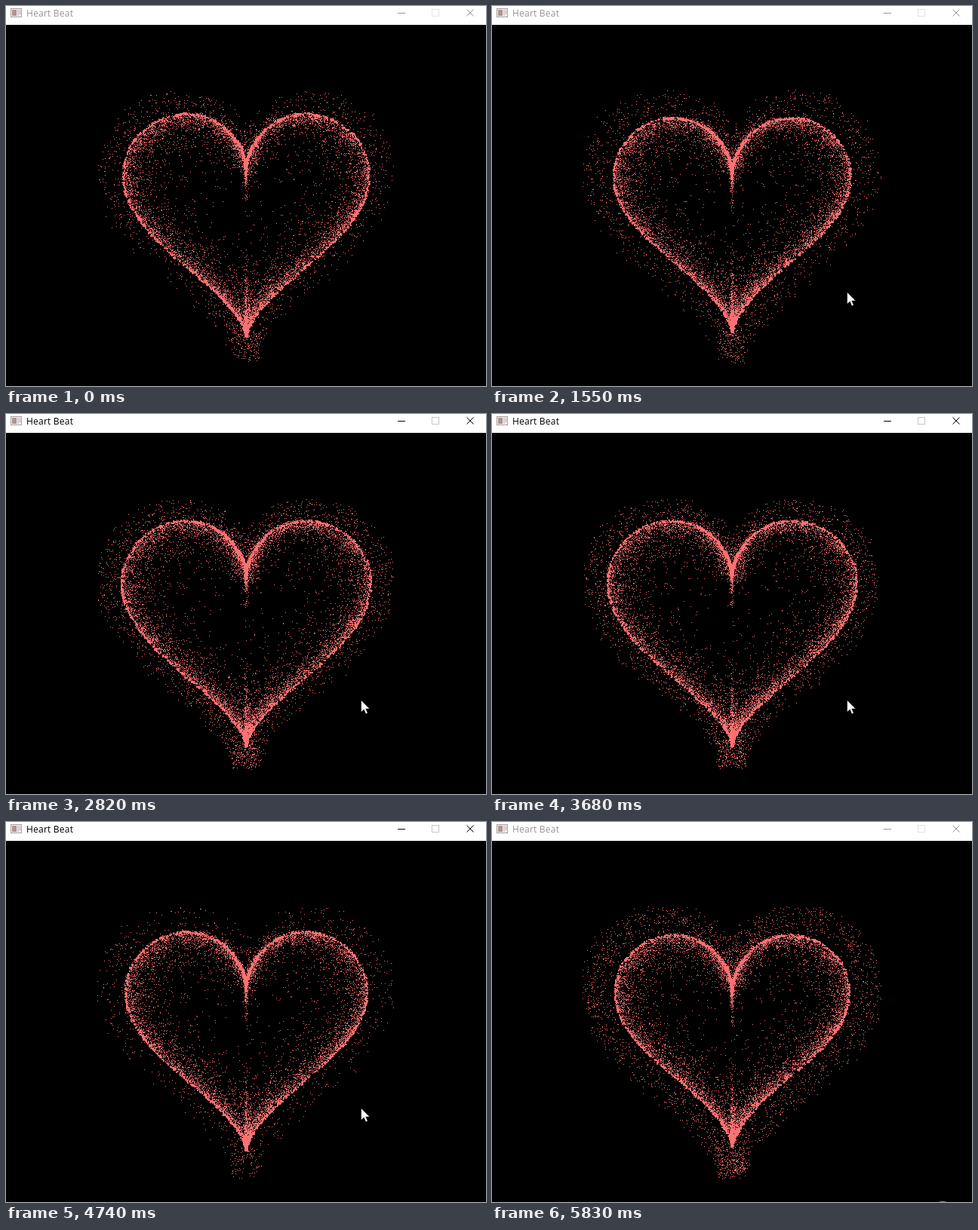
Write an HTML page with a canvas that moves like this. It is 636 px wide and 504 px high and loops after 5900 ms.

```html
<!DOCTYPE html>
<html lang="en">
<head>
<meta charset="utf-8">
<title>Heart Beat</title>
<style>
  html, body { margin: 0; width: 100%; height: 100%; overflow: hidden; background: #000; }
  #stage { position: relative; width: 636px; height: 504px; overflow: hidden; background: #000; }
  #stage > * { position: absolute; left: 0; top: 0; }
  #bar { width: 636px; height: 25px; background: #fff; color: #000; --max: #c6c6c6; }
  #bar.idle { color: #9a9294; --max: #e4e4e4; }
  #bar svg { position: absolute; left: 0; top: 0; }
  #bar span {
    position: absolute; left: 27px; top: 1px; white-space: pre;
    font: 12px/18px "Open Sans", "Noto Sans", sans-serif; letter-spacing: .22px;
  }
</style>
</head>
<body>
<div id="stage">
  <canvas id="heart" width="636" height="504"></canvas>
  <div id="bar" class="idle">
    <svg width="636" height="25" fill="none">
      <rect x="6.5" y="3.5" width="14" height="11" fill="#f4f1f1" stroke="#a79d9d"/>
      <rect x="8" y="5" width="6" height="8" fill="#b19292"/>
      <path d="M15 5h2v8h-2z" fill="#d2caca"/>
      <path d="M18 5h1v6h-1z" fill="#b9adad"/>
      <path d="M519 9.5h10M610.5 4.5l9 9M619.5 4.5l-9 9" stroke="currentColor"/>
      <rect x="564.5" y="4.5" width="9" height="9" stroke="var(--max)"/>
    </svg>
    <span>Heart Beat</span>
  </div>
  <svg id="ring" width="636" height="504" fill="none">
    <circle cx="597" cy="515" r="11.5" stroke="#a87a1c" stroke-width="1.5"/>
  </svg>
  <svg id="cursor" width="13" height="21">
    <path d="M.5 .5v16l3.7-3.5 2.5 5.8 2.6-1.1-2.5-5.6h5z" fill="#fff" stroke="#000" stroke-width=".6"/>
  </svg>
</div>
<script>
const LOOP = 5900, CX = 318, CY = 265, SCALE = 10, HALO_SCALE = 11, FIRST_BEAT = 3;

// Times at which the next beat is drawn
const beats = [0, 130, 330, 470, 670, 800, 1000, 1200, 1350, 1550, 1750, 1890,
  2080, 2280, 2410, 2610, 2820, 2950, 3150, 3350, 3480, 3680, 3880, 4010,
  4210, 4410, 4540, 4740, 4940, 5070, 5270, 5430, 5630, 5830];

// Pointer: time, x, y
const pointer = [[0, 700, 520], [200, 535, 466], [270, 509, 432], [330, 482, 398],
  [470, 470, 379], [5130, 482, 394], [5200, 516, 430], [5270, 553, 467],
  [5330, 585, 491], [5430, 700, 520]];

const ACTIVE_FROM = 2820, ACTIVE_TO = 5760;

const el = id => document.getElementById(id);
const ctx = el("heart").getContext("2d");
const { sin, cos, log, floor, hypot, PI } = Math;

function seeded(seed) {
  return () => {
    seed = seed + 0x6D2B79F5 | 0;
    let n = Math.imul(seed ^ seed >>> 15, 1 | seed);
    n = n + Math.imul(n ^ n >>> 7, 61 | n) ^ n;
    return ((n ^ n >>> 14) >>> 0) / 4294967296;
  };
}
const randInt = (rnd, lo, hi) => lo + floor(rnd() * (hi - lo + 1));

// Heart curve around the origin, on whole pixels
function outline(t, scale) {
  const y = 13 * cos(t) - 5 * cos(2 * t) - 2 * cos(3 * t) - cos(4 * t);
  return [floor(16 * sin(t) ** 3 * scale + CX) - CX, floor(CY - y * scale) - CY];
}

function scatter([x, y], beta, rnd) {
  const pull = () => 1 + beta * log(1 - rnd());
  return [x * pull(), y * pull()];
}

function build() {
  const rnd = seeded(77);
  const line = Array.from({ length: 2000 }, () => outline(rnd() * 2 * PI, SCALE));
  const edge = line.flatMap(p => [0, 1, 2].map(() => scatter(p, 0.05, rnd)));
  const inner = Array.from({ length: 4000 },
    () => scatter(line[floor(rnd() * line.length)], 0.17, rnd));
  return { line, edge, inner };
}
const shape = build();

function dot(x, y, size) {
  ctx.fillRect(Math.round(CX + x), Math.round(CY + y), size, size);
}

function drawBeat(beat) {
  const rnd = seeded(1000 + beat % 20 * 97);
  const wave = 2 / PI * sin(0.4 * PI * beat);
  ctx.clearRect(0, 0, 636, 504);
  ctx.fillStyle = "#ff7171";

  const reach = floor(4 + 6 * (1 + wave));
  const count = floor(1000 + 4500 * wave * wave);
  for (let i = 0; i < count; i++) {
    const [x, y] = outline(rnd() * 2 * PI, HALO_SCALE);
    const grow = 1 + reach / hypot(x, y) ** 1.2;
    dot(x * grow + randInt(rnd, -18, 18), y * grow + randInt(rnd, -18, 18), 1);
  }

  const drawSet = (points, maxSize) => {
    for (const [x, y] of points) {
      const k = 1 - 10 * wave / Math.max(1, hypot(x, y)) ** 1.04;
      dot(x * k - randInt(rnd, -1, 1), y * k - randInt(rnd, -1, 1), randInt(rnd, 1, maxSize));
    }
  };
  drawSet(shape.line, 2);
  drawSet(shape.edge, 1);
  drawSet(shape.inner, 1);
}

let shown = -1;
const start = performance.now();

function render() {
  const t = (performance.now() - start) % LOOP;
  const step = beats.findLastIndex(b => b <= t);
  if (step !== shown) drawBeat(FIRST_BEAT + (shown = step));

  const [, x, y] = pointer.findLast(p => p[0] <= t);
  el("cursor").style.transform = `translate(${x}px, ${y}px)`;
  el("bar").className = t >= ACTIVE_FROM && t < ACTIVE_TO ? "" : "idle";
  el("ring").style.visibility = t >= ACTIVE_TO ? "visible" : "hidden";
  requestAnimationFrame(render);
}
render();
</script>
</body>
</html>
```
